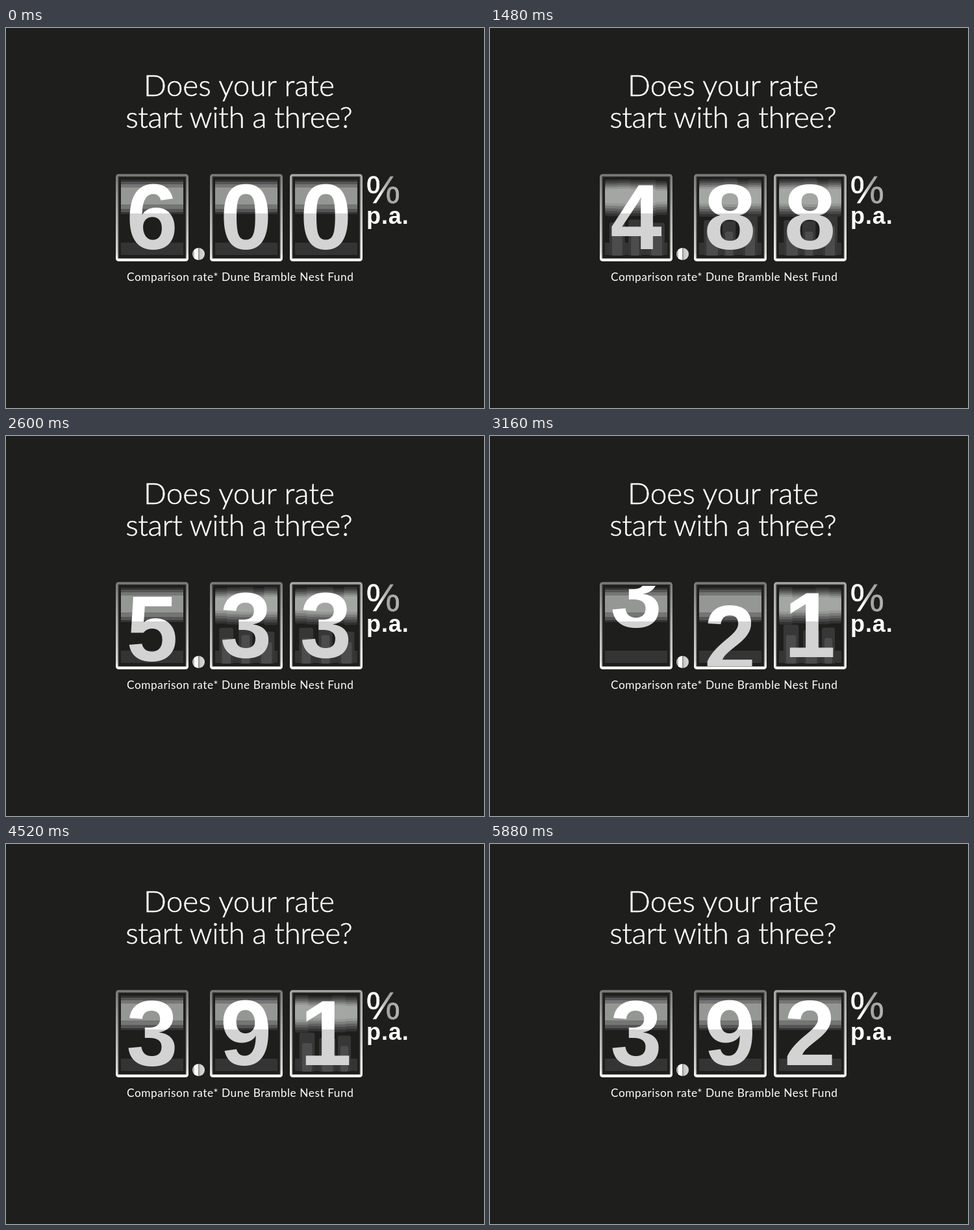
Recreate the animation shown at these times as an HTML page. Size 736 by 586 pixels, loop 6000 ms.

```html
<!DOCTYPE html>
<html lang="en">
<head>
<meta charset="utf-8">
<title>Rate counter</title>
<style>
  html, body { margin: 0; width: 100%; height: 100%; overflow: hidden; background: #1e1e1c; }
  svg { display: block; }
  .head { font: 300 46px Lato, "Open Sans", sans-serif; fill: #fff; stroke: #fff; stroke-width: .5; text-anchor: middle; }
  .tight { letter-spacing: -.45px; }
  .note { font: 400 17.3px Lato, "Open Sans", sans-serif; letter-spacing: .55px; fill: #fff; }
  .digit { font: 700 143px "Liberation Sans", Arial, sans-serif; fill: url(#ink); text-anchor: middle; }
  .unit { font: 700 36px "Liberation Sans", Arial, sans-serif; letter-spacing: .9px; fill: #fff; }
  .pct { font: 400 59px "Liberation Sans", Arial, sans-serif; fill: url(#fade); stroke: url(#fade); stroke-width: .5; }
</style>
</head>
<body>
<svg width="736" height="586" viewBox="0 0 736 586">
  <defs>
    <linearGradient id="ink" gradientUnits="userSpaceOnUse" x1="0" y1="231" x2="0" y2="341">
      <stop offset=".5" stop-color="#fff"/><stop offset=".5" stop-color="#d3d3d3"/>
    </linearGradient>
    <linearGradient id="fade" gradientUnits="userSpaceOnUse" x1="555" y1="0" x2="607" y2="0">
      <stop offset=".38" stop-color="#fff"/><stop offset=".5" stop-color="#c4c4c4"/>
      <stop offset=".66" stop-color="#a2a2a2"/><stop offset="1" stop-color="#b8b8b8"/>
    </linearGradient>
    <linearGradient id="rim" gradientUnits="userSpaceOnUse" x1="0" y1="225" x2="0" y2="360">
      <stop offset=".02" stop-color="#7c7c7c"/><stop offset=".4" stop-color="#a8a8a8"/>
      <stop offset=".9" stop-color="#d6d6d6"/><stop offset="1" stop-color="#fff"/>
    </linearGradient>
    <linearGradient id="rimLight" gradientUnits="userSpaceOnUse" x1="0" y1="225" x2="0" y2="360">
      <stop offset=".02" stop-color="#a6a6a6"/><stop offset=".4" stop-color="#bebebe"/>
      <stop offset="1" stop-color="#f4f4f0"/>
    </linearGradient>
    <linearGradient id="ball" x1="0" x2="1" y1="0" y2="0">
      <stop offset=".16" stop-color="#bdbdbd"/><stop offset=".16" stop-color="#fff"/>
      <stop offset=".45" stop-color="#fff"/><stop offset=".45" stop-color="#8c8c8c"/>
      <stop offset=".6" stop-color="#a4a4a4"/><stop offset=".6" stop-color="#c8c8c8"/>
      <stop offset="1" stop-color="#dadada"/>
    </linearGradient>
    <clipPath id="window"><rect x="160" y="231" width="400" height="124"/></clipPath>
  </defs>
  <rect width="736" height="586" fill="#1e1e1c"/>
  <text class="head" x="359" y="105">Does your rate</text>
  <text class="head tight" x="358.7" y="154">start with a three?</text>
  <g id="reels"></g>
  <circle cx="296.5" cy="348.5" r="9.5" fill="url(#ball)"/>
  <text class="pct" x="554.5" y="270">%</text>
  <text class="unit" x="555" y="301.5">p.a.</text>
  <text class="note" x="186" y="390">Comparison rate* Dune Bramble Nest Fund</text>
</svg>
<script>
const NS = "http://www.w3.org/2000/svg";
const LOOP = 6000, LAST = 141, BASE = 341, PITCH = 165, COLS = 5, TRAILS = 3;
const SHADES = ["#333", "#484848", "#616261", "#7c7e7c", "#959795", "#a4a6a4"];

// Each reel spins until `from`, then rolls `turns` digits down to `land` by `to`.
const SPECS = [
  { x: 169, mid: 225, start: 6, land: 3, turns: 3, from: 54, to: 77.2, rim: "rim" },
  { x: 314, mid: 369.5, start: 0, land: 9, turns: 3, from: 74, to: 98.45, rim: "rim" },
  { x: 437, mid: 492.5, start: 0, land: 2, turns: 2, from: 119.9, to: 141, rim: "rimLight" }
];

function add(parent, tag, attrs) {
  const el = document.createElementNS(NS, tag);
  for (const k in attrs) el.setAttribute(k, attrs[k]);
  return parent.appendChild(el);
}
const box = (p, x, y, width, height, fill, rx = 0) =>
  add(p, "rect", { x, y, width, height, fill, rx });
const mod10 = v => ((v % 10) + 10) % 10;
const noise = seed => {
  const v = Math.sin(seed * 12.9898) * 43758.5453;
  return v - Math.floor(v);
};

function buildReel(spec) {
  const root = document.getElementById("reels"), { x } = spec;
  add(root, "rect", { x: x + 1.8, y: 227, width: 108.4, height: 131, rx: 2.5,
    fill: "#1e1e1c", stroke: `url(#${spec.rim})`, "stroke-width": 3.6 });
  add(root, "rect", { x: x + 4.5, y: 229.5, width: 103, height: 126, fill: "none", stroke: "#383837" });
  box(root, x + 3, 355.5, 106, 3, "#fff");

  box(root, x + 8, 331, 96, 19, "#343434");
  const still = add(root, "g", {});
  box(still, x + 8, 234, 96, 53, "#333");
  box(still, x + 8, 237, 96, 47, "#555");
  box(still, x + 8, 241, 96, 38, "#747574");
  box(still, x + 8, 246, 96, 26, "#959795");

  const blur = add(root, "g", { "clip-path": "url(#window)" });
  const row = (count, fill) => Array.from({ length: count }, () => box(blur, 0, 0, 0, 0, fill, 3));
  const trails = ["#373737", "#4c4c4c"].map(fill => row(TRAILS, fill));
  const glow = SHADES.map(fill => row(COLS, fill));

  const clip = add(root, "g", { "clip-path": "url(#window)" });
  const digits = [0, 1].map(() => add(clip, "text", { class: "digit", x: spec.mid }));
  return { ...spec, still, blur, glow, trails, digits };
}

function place(el, x, y, width, height) {
  const attrs = { x, y, width, height };
  for (const k in attrs) el.setAttribute(k, attrs[k]);
}

// Scalloped sheen above, soft vertical trails below.
function drawBlur(reel, digit) {
  const left = reel.x + 8, colWidth = 96 / COLS;
  reel.glow.forEach((row, k) => row.forEach((el, j) => {
    const wave = noise(digit * 7 + j * 3 + 1) * 4;
    const from = Math.max(0, j * colWidth - 2), to = Math.min(96, (j + 1) * colWidth + 2);
    const top = 232 + k * 3 + wave, bottom = 292 - k * 4 - wave;
    place(el, left + from, top, to - from, bottom - top);
  }));
  reel.trails.forEach((row, k) => row.forEach((el, j) => {
    const a = noise(digit * 5 + j * 11 + 2), b = noise(digit * 13 + j * 5 + 4);
    const top = 288 + a * 18 + k * 16, width = 20 + b * 8 - k * 8;
    place(el, left + 16 + j * 30 + b * 6 - width / 2, top, width, 351 - top);
  }));
}

function setDigit(el, value, shift) {
  el.textContent = mod10(value);
  el.setAttribute("y", BASE + shift);
}

function drawReel(reel, n) {
  const rolling = n >= reel.from, spinning = n > 0 && !rolling;
  reel.blur.style.display = spinning ? "" : "none";
  reel.still.style.display = spinning ? "none" : "";
  if (!rolling) {
    const digit = mod10(reel.start - n % 11);
    if (spinning) drawBlur(reel, digit);
    setDigit(reel.digits[0], digit, 0);
    setDigit(reel.digits[1], digit - 1, -PITCH);
    return;
  }
  const pos = Math.min(1, (n - reel.from) / (reel.to - reel.from)) * reel.turns;
  const whole = Math.floor(pos), part = pos - whole;
  const digit = reel.land + reel.turns - whole;
  setDigit(reel.digits[0], digit, part * PITCH);
  setDigit(reel.digits[1], digit - 1, (part - 1) * PITCH);
}

// 24 steps a second on a 40 ms grid; the first step of each second lasts two slots.
function stepAt(ms) {
  const slot = Math.floor((ms % LOOP) / 40);
  return Math.min(LAST, Math.floor(slot / 25) * 24 + Math.max(0, slot % 25 - 1));
}

const reels = SPECS.map(buildReel);
const t0 = performance.now();
let shown = -1;
function tick() {
  const n = stepAt(Math.max(0, performance.now() - t0));
  if (n !== shown) reels.forEach(reel => drawReel(reel, n));
  shown = n;
  requestAnimationFrame(tick);
}
tick();
</script>
</body>
</html>
```
